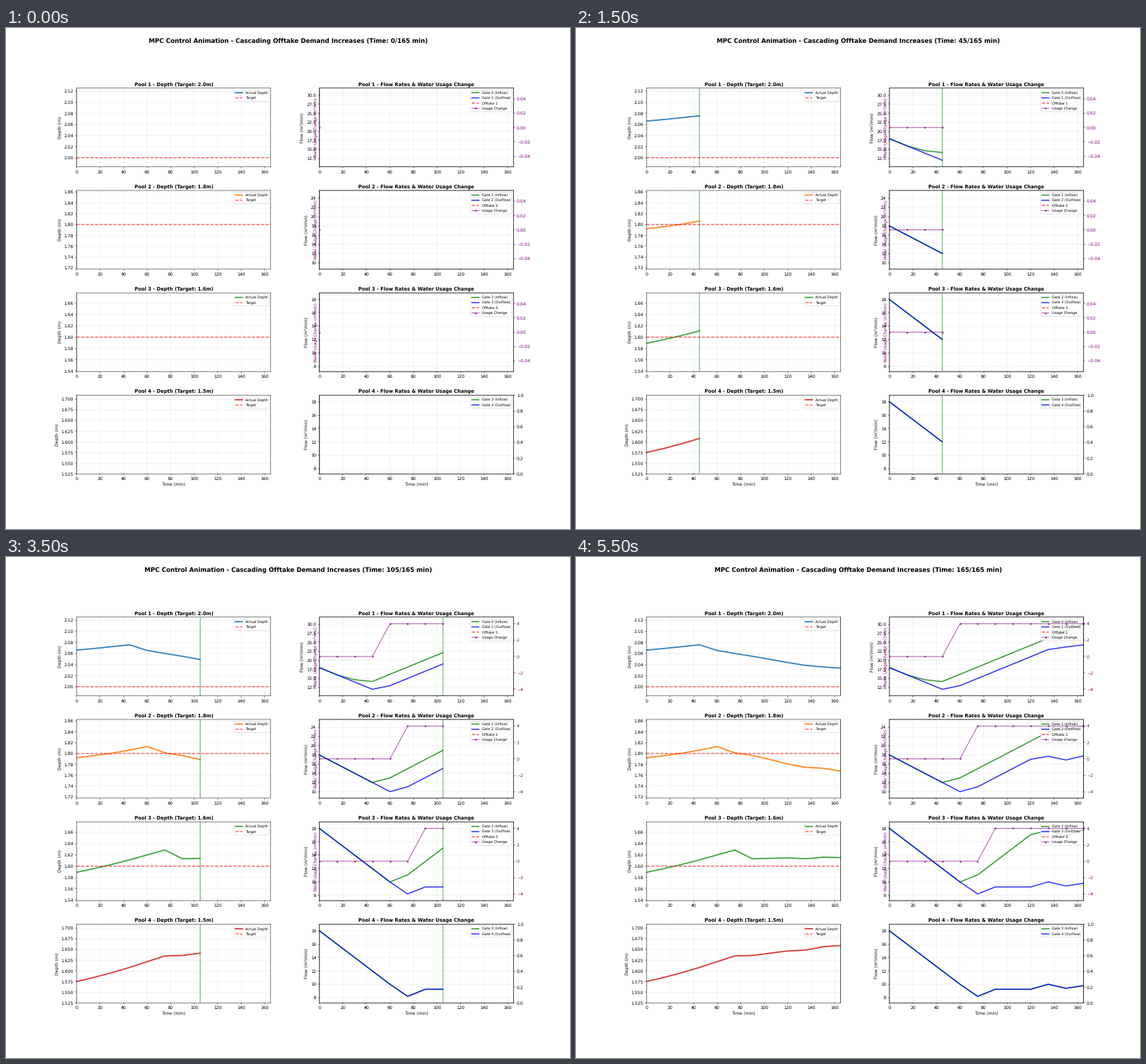
A matplotlib script that plays this animation: 794x706 px, repeating every 6 s.

```python
import numpy as np
import matplotlib.pyplot as plt
from matplotlib.animation import FuncAnimation

WIDTH, HEIGHT, DPI = 794, 706, 44.125
STEP, FRAMES = 15, 12
END = STEP * (FRAMES - 1)

plt.rcParams.update({
    "font.family": "DejaVu Sans",
    "text.hinting": "none",
    "path.snap": False,
})

time = np.arange(FRAMES) * STEP
targets = [2.0, 1.8, 1.6, 1.5]
depths = np.array([
    [2.0661, 2.0691, 2.0723, 2.0757, 2.0655, 2.0601,
     2.0549, 2.0493, 2.0437, 2.0385, 2.0357, 2.0335],
    [1.7920, 1.7960, 1.8005, 1.8063, 1.8128, 1.8012,
     1.7962, 1.7888, 1.7806, 1.7745, 1.7727, 1.7675],
    [1.5890, 1.5957, 1.6030, 1.6111, 1.6199, 1.6286,
     1.6130, 1.6138, 1.6147, 1.6131, 1.6159, 1.6152],
    [1.5750, 1.5848, 1.5957, 1.6080, 1.6215, 1.6350,
     1.6360, 1.6414, 1.6467, 1.6485, 1.6566, 1.6594],
])


def ramp(start, step, count):
    return start + step * np.arange(count)


gate3 = np.r_[ramp(18, -2, 5), 8.2, [9.25] * 3, 10, 9.4, 9.8]
gates = [
    np.r_[18, 16, 14.65, ramp(14.15, 2, 9)],
    np.r_[ramp(18, -2, 4), ramp(13, 2, 6), 23.7, 24.3],
    np.r_[ramp(18, -2, 5), ramp(11.05, 2, 4), 17.7, 16.9, 17.8],
    gate3,
    gate3,
]
# Offtake demand rises by 4 in one pool after another.
usage = [np.where(time >= start, 4, 0) for start in (60, 75, 90)]

fig, axes = plt.subplots(4, 2, figsize=(WIDTH / DPI + 1e-6, HEIGHT / DPI + 1e-6),
                         dpi=DPI)
fig.subplots_adjust(left=0.125, right=0.9, bottom=0.11, top=0.88,
                    wspace=0.25, hspace=0.3)
heading = fig.suptitle("", fontsize=14, fontweight="bold")

traces = []        # (line, values) pairs revealed over time
cursors = []
usage_axes = []


def add_trace(ax, values, **style):
    line, = ax.plot([], [], **style)
    traces.append((line, values))
    return line


def finish(ax, title, ylabel, low, high, pad, handles):
    ax.set_title(title, fontsize=11, fontweight="bold")
    ax.set_ylabel(ylabel)
    ax.set_xlim(0, END)
    ax.set_ylim(low - pad, high + pad)
    ax.grid(True, alpha=0.3)
    cursors.append(ax.axvline(0, color="green", lw=1.5, alpha=0.7))
    ax.legend(handles=handles, loc="upper right", fontsize=8)


for i, (depth_ax, flow_ax) in enumerate(axes):
    pool = i + 1
    depth = depths[i]
    actual = add_trace(depth_ax, depth, color=f"C{i}", lw=3, alpha=0.9,
                       label="Actual Depth")
    target = depth_ax.axhline(targets[i], color="red", ls="--", lw=2,
                              alpha=0.7, label="Target")
    finish(depth_ax, f"Pool {pool} - Depth (Target: {targets[i]}m)", "Depth (m)",
           depth.min(), depth.max(), 0.05, [actual, target])

    handles = [
        add_trace(flow_ax, gates[i], color="green", lw=2.5, alpha=0.8,
                  label=f"Gate {i} (Inflow)"),
        add_trace(flow_ax, gates[pool], color="blue", lw=2.5, alpha=0.8,
                  label=f"Gate {pool} (Outflow)"),
    ]
    twin = flow_ax.twinx()
    if i < len(usage):
        handles.append(add_trace(flow_ax, usage[i], color="red", ls="--", lw=2,
                                 alpha=0.8, label=f"Offtake {pool}"))
        handles.append(add_trace(twin, usage[i], color="purple", lw=1.5,
                                 marker="o", ms=3, alpha=0.7,
                                 label="Usage Change"))
        twin.set_ylabel("Water Usage Change (m³/min)", color="purple", fontsize=9)
        twin.yaxis.set_label_position("left")
        twin.tick_params(axis="y", labelcolor="purple")
        usage_axes.append((twin, usage[i]))
    flows = np.r_[gates[i], gates[pool]]
    finish(flow_ax, f"Pool {pool} - Flow Rates & Water Usage Change",
           "Flow (m³/min)", flows.min(), flows.max(), 0.1 * np.ptp(flows), handles)

for ax in axes[-1]:
    ax.set_xlabel("Time (min)")


def update(frame):
    now = time[frame]
    heading.set_text("MPC Control Animation - Cascading Offtake Demand Increases "
                     f"(Time: {now}/{END} min)")
    shown = slice(frame + 1)
    for line, values in traces:
        line.set_data(time[shown], values[shown])
    for cursor in cursors:
        cursor.set_xdata([now, now])
    for ax, values in usage_axes:
        limit = 1.2 * values[frame] or 0.055
        ax.set_ylim(-limit, limit)


anim = FuncAnimation(fig, update, frames=FRAMES, interval=500, repeat=True,
                     repeat_delay=0, blit=False)
plt.show()
```
